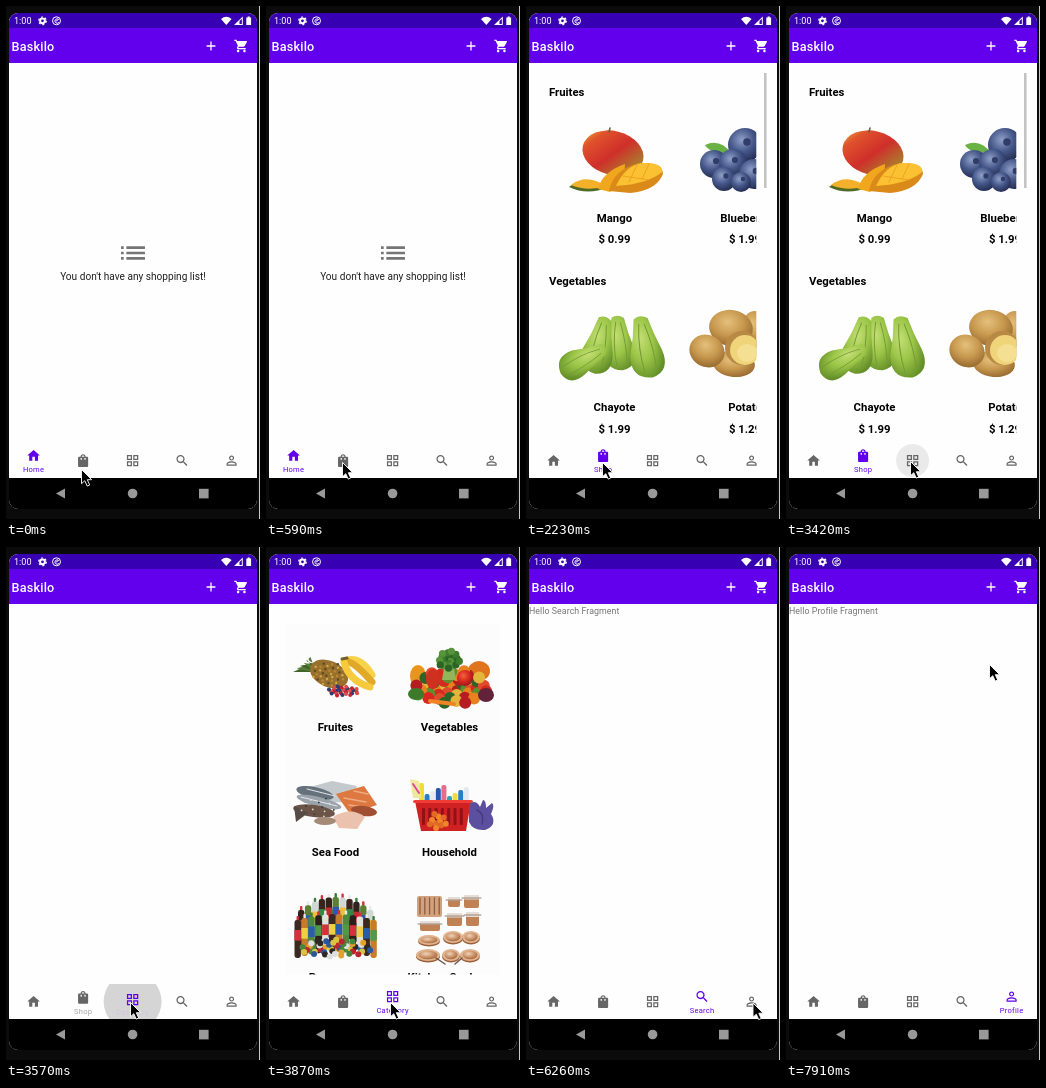
Animation of 254 by 513 pixels, one loop 8000 ms. Source, as an HTML page:

```html
<!DOCTYPE html>
<html lang="en">
<head>
<meta charset="utf-8">
<title>Shopping app</title>
<style>
html, body { margin: 0; width: 100%; height: 100%; overflow: hidden; background: #0b0b0b; }
svg { display: block; width: 100%; height: 100%; font-family: Roboto, sans-serif; }
.bold { font-weight: 700; font-size: 11.37px; fill: #000; }
.mid { text-anchor: middle; }
.hello { font-size: 8.84px; letter-spacing: .05px; fill: #757575; }
.label { font-size: 7.58px; letter-spacing: .0333em; text-anchor: middle; }
</style>
</head>
<body>
<svg id="stage" viewBox="0 0 254 513"></svg>
<script>
const LOOP = 8000, PURPLE = '#6200ee', GREY = '#666';

const ICONS = {
  home: 'M10 20v-6h4v6h5v-8h3L12 3 2 12h3v8z',
  bag: 'M18 6h-2c0-2.21-1.79-4-4-4S8 3.79 8 6H6c-1.1 0-2 .9-2 2v12c0 1.1.9 2 2 2h12c1.1 0 2-.9 2-2V8c0-1.1-.9-2-2-2zm-8 4c0 .55-.45 1-1 1s-1-.45-1-1V8h2zm2-6c1.1 0 2 .9 2 2h-4c0-1.1.9-2 2-2zm4 6c0 .55-.45 1-1 1s-1-.45-1-1V8h2z',
  grid: 'M3 3v8h8V3zm6 6H5V5h4zm-6 4v8h8v-8zm6 6H5v-4h4zm4-16v8h8V3zm6 6h-4V5h4zm-6 4v8h8v-8zm6 6h-4v-4h4z',
  search: 'M15.5 14h-.79l-.28-.27C15.41 12.59 16 11.11 16 9.5 16 5.91 13.09 3 9.5 3S3 5.91 3 9.5 5.91 16 9.5 16c1.61 0 3.09-.59 4.23-1.57l.27.28v.79l5 4.99L20.49 19zm-6 0C7.01 14 5 11.99 5 9.5S7.01 5 9.5 5 14 7.01 14 9.5 11.99 14 9.5 14z',
  person: 'M12 5.9c1.16 0 2.1.94 2.1 2.1s-.94 2.1-2.1 2.1S9.9 9.16 9.9 8s.94-2.1 2.1-2.1m0 9c2.97 0 6.1 1.46 6.1 2.1v1.1H5.9V17c0-.64 3.13-2.1 6.1-2.1M12 4C9.79 4 8 5.79 8 8s1.79 4 4 4 4-1.79 4-4-1.79-4-4-4zm0 9c-2.67 0-8 1.34-8 4v3h16v-3c0-2.66-5.33-4-8-4z',
  cart: 'M7 18c-1.1 0-2 .9-2 2s.9 2 2 2 2-.9 2-2-.9-2-2-2zM1 2v2h2l3.6 7.59-1.35 2.45C4.52 15.37 5.48 17 7 17h12v-2H7.42l-.22-.37.9-1.63h7.45c.75 0 1.41-.41 1.75-1.03l3.58-6.49C21.25 4.82 20.77 4 20 4H5.21l-.94-2zm16 16c-1.1 0-2 .9-2 2s.9 2 2 2 2-.9 2-2-.9-2-2-2z',
  plus: 'M19 13h-6v6h-2v-6H5v-2h6V5h2v6h6z',
  list: 'M3 13h2v-2H3zm0 4h2v-2H3zm0-8h2V7H3zm4 4h14v-2H7zm0 4h14v-2H7zM7 7v2h14V7z'
};
const TABS = [['home', 'Home'], ['bag', 'Shop'], ['grid', 'Category'], ['search', 'Search'], ['person', 'Profile']];
const tabX = i => 27.6 + 49.5 * i;

// Markup helpers
const icon = (name, x, y, fill, scale = .6315) =>
  `<path d="${ICONS[name]}" fill="${fill}" transform="translate(${x} ${y}) scale(${scale}) translate(-12 -12)"/>`;
const text = (x, y, str, cls, extra = '') => `<text x="${x}" y="${y}" class="${cls}" ${extra}>${str}</text>`;
const rect = (x, y, w, h, fill, r = 0) => `<rect x="${x}" y="${y}" width="${w}" height="${h}" rx="${r}" fill="${fill}"/>`;
const oval = (x, y, rx, ry, fill, turn = 0) =>
  `<ellipse cx="${x}" cy="${y}" rx="${rx}" ry="${ry}" fill="${fill}" transform="rotate(${turn} ${x} ${y})"/>`;
const ball = (x, y, r, fill) => oval(x, y, r, r, fill);
const shape = (d, fill) => `<path d="${d}" fill="${fill}"/>`;
const line = (d, color, width) => `<path d="${d}" fill="none" stroke="${color}" stroke-width="${width}" stroke-linecap="round"/>`;
const glow = (id, ...colors) => `<radialGradient id="${id}" cx=".4" cy=".35" r=".7">` +
  colors.map((c, i) => `<stop offset="${i / (colors.length - 1)}" stop-color="${c}"/>`).join('') + '</radialGradient>';
const clip = (id, x, y, w, h, r = 0) => `<clipPath id="${id}">${rect(x, y, w, h, '#000', r)}</clipPath>`;
const repeat = (n, draw) => Array.from({ length: n }, (_, i) => draw(i)).join('');
const pick = (list, i) => list[i % list.length];
// Dots spread evenly over an oval along a sunflower spiral
const scatter = (n, x, y, rx, ry, size, colors) => repeat(n, i => {
  const spread = Math.sqrt((i + .5) / n), angle = i * 2.4;
  return ball(x + rx * spread * Math.cos(angle), y + ry * spread * Math.sin(angle), size, pick(colors, i));
});

const defs = `<defs>
  ${glow('red', '#f4623c', '#d92a20', '#96141c')}${glow('blue', '#8ea0c8', '#46578a', '#20294d')}
  ${glow('potato', '#e5c07c', '#c99a50', '#94682f')}${glow('pear', '#c3de74', '#9cc648', '#648f28')}
  ${glow('copper', '#efd3b8', '#cf9a72', '#a5653d')}
  <linearGradient id="mango" x2="1" y2=".6"><stop stop-color="#e8b93c"/><stop offset=".25" stop-color="#e0522c"/>
    <stop offset=".6" stop-color="#cf2f2a"/><stop offset="1" stop-color="#a8842f"/></linearGradient>
  ${clip('screen', 3, 7, 248, 496, 9)}${clip('rows', 3, 57, 227.3, 380)}
  ${clip('cells', 3, 57, 248, 370.5)}${clip('tabs', 3, 437, 248, 35)}
</defs>`;

// Product pictures
const mango = () =>
  oval(87, 147, 31, 22, 'url(#mango)', 14) + line('M83 126l1-4', '#6d5a32', 1.5) +
  shape('M43 181Q58 168 82 181Q62 190 43 181Z', '#4f6a25') + shape('M45 179Q60 167 80 180Q62 186 45 179Z', '#f3b02a') +
  shape('M72 183Q76 166 99 158Q99 176 84 186Z', '#f0a71d') +
  shape('M83 185Q87 163 114 157Q137 156 137 168Q130 185 104 187Z', '#d98a18') +
  shape('M90 180Q99 160 116 157Q137 156 136 166Q122 178 90 180Z', '#fcc132') +
  line('M103 176l8-17m5 14l7-15m-26 12l26 4', '#e79c1c', .8);

const blueberries = () =>
  shape('M203 147Q203 127 219 123Q221 140 203 147Z', '#4f9d33') + shape('M205 147Q184 148 179 139Q194 132 205 147Z', '#69b243') +
  [[219, 139, 17], [188, 158, 14], [207, 157, 14], [228, 168, 15], [198, 173, 12], [215, 176, 10]]
    .map(([x, y, r]) => ball(x, y, r, 'url(#blue)') + ball(x + 2, y - 3, r * .22, '#313d68')).join('');

const pear = ([x, y, size, turn]) => `<g transform="translate(${x} ${y}) rotate(${turn}) scale(${size})">
  ${shape('M-6 -27Q0 -31 7 -26Q10 -10 15 5Q20 26 2 29Q-18 27 -15 6Q-9 -10 -6 -27Z', 'url(#pear)')}
  ${line('M-2 -22Q-7 0 -4 24M3 -21Q8 2 7 22', '#759c36', 1)}</g>`;
const chayote = () => [[93, 337, .95, -4], [73, 339, 1, 12], [119, 341, 1.08, -10], [57, 354, .9, 62]].map(pear).join('');

const potatoes = () =>
  oval(229, 323, 14, 18, 'url(#potato)') + oval(205, 322, 22, 18, 'url(#potato)', 10) + oval(208, 358, 21, 13, 'url(#potato)', 5) +
  oval(181, 345, 18, 16, 'url(#potato)', 25) + oval(216, 342, 17, 17, '#b78945') + oval(219, 344, 15, 15, '#f0d479') +
  oval(221, 347, 10, 9, '#f5df92');

const fruits = () =>
  repeat(6, i => shape(`M50 125L${27 + i * 3.5} ${125 - i * 3}Q38 ${119 - i} 54 118Z`, pick(['#3f6428', '#587c3a'], i))) +
  oval(63, 127, 20, 13, '#96702c', 24) + scatter(34, 63, 127, 17, 12, 1.2, ['#d4a846', '#5f471f', '#b98a36']) +
  line('M82 113Q95 110 106 128', '#f8d34a', 7) + line('M79 114Q88 114 106 135', '#e2a928', 7) +
  line('M78 115Q83 134 104 140', '#f6ca3a', 7) + line('M76 112l5-1', '#74612a', 3) +
  scatter(30, 77, 144, 16, 5, 2, ['#c02232', '#2d3c6c', '#de4b49']);

const vegetables = () =>
  oval(152, 129, 8, 11, '#e9951d') + oval(213, 124, 11, 10, '#e0741d') +
  scatter(46, 185, 140, 38, 17, 6, ['#d5291f', '#5d8f2f', '#e8811f', '#b51d20', '#e3b53a', '#2f6426', '#e14a2b']) +
  shape('M178 121h10l2 12h-14z', '#91b65a') + scatter(24, 183, 113, 11, 9, 3.6, ['#3b7d2c', '#2c6424', '#56933b']) +
  ball(199, 131, 8, 'url(#red)') + oval(167, 132, 7, 10, '#cf3120') + oval(150, 147, 8, 6, '#3d7a2a') +
  oval(220, 148, 8, 7, '#62233a') + line('M164 154L188 157', '#ef8325', 4);

const seafood = () =>
  shape('M33 243L66 234L91 239L85 255L38 256Z', '#c3c9cc') + oval(49, 246, 19, 6, '#66727b', 12) + oval(53, 255, 23, 5, '#9aa3a9', 14) +
  line('M35 250l36 9m-30-17l28 7', '#e4e7e8', 1) + oval(48, 264, 21, 6, '#6a5548', 8) + shape('M28 259L42 266L30 275Z', '#574b45') +
  shape('M70 247L98 239L111 258L84 267Z', '#dd7840') + line('M78 251l22 4m-17 3l20 3m-15-17l14 3', '#f0ab82', 1.3) +
  oval(98, 264, 13, 5, '#a04f33', 8) + shape('M67 270Q85 259 99 270L91 282L73 281Z', '#ebc2ad') +
  oval(59, 274, 11, 4, '#a58a78') + scatter(12, 52, 260, 20, 10, .9, ['#3a3532', '#dcdcda']);

const household = () =>
  repeat(9, i => rect(153 + i * 5.6, 236 + i * 11 % 14, 5, 27, pick(['#f1dc36', '#2a7fc4', '#e4e9ee', '#2456ae', '#e46c8c', '#35a0b6'], i), 2)) +
  shape('M144 232l9 2 2 17h-8z', '#f0e8a0') + line('M147 237l6 9', '#db4f92', 2) +
  shape('M149 254H205L200 284H155Z', '#cf2022') + rect(147, 253, 60, 3, '#ef3d35', 2) +
  repeat(7, i => rect(156 + i * 6.3, 261, 3, 17, '#8e1218', 1)) + scatter(10, 172, 274, 9, 9, 3, ['#f0852a', '#e26a25']) +
  shape('M203 257Q210 252 214 260L217 253Q220 253 220 261L226 256Q229 258 225 267Q232 278 219 283Q207 284 203 275Z', '#5d4f9f') +
  line('M211 263q8 4 5 14', '#433a81', 1.5);

// Bottles stand in a dome: the middle ones reach higher
const bottle = (x, y, h, color, cap, label) =>
  rect(x + 2, y, 2.4, 5, cap, 1) + rect(x, y + 4, 6.4, h, color, 2.4) + rect(x, y + 14, 6.4, h * .28, label);
const bottles = (n, left, top, bend, h, colors, labels) => repeat(n, i => {
  const fromMiddle = 2 * i / (n - 1) - 1;
  return bottle(left + i * 6.9, top + bend * fromMiddle ** 2, h, pick(colors, i), pick(['#d8303b', '#e9e9e9', '#3a7d3a'], i), pick(labels, i));
});
const beverages = () =>
  bottles(11, 32, 346, 13, 40, ['#33211c', '#5c7f36', '#cfd8d4', '#3a241d'], ['#c72930', '#2a5bb0', '#e9c23b', '#398747']) +
  bottles(12, 28.5, 363, 6, 38, ['#3c2823', '#c97b2c', '#4f8a3c', '#2b1f1b', '#dfe3da'], ['#d8303b', '#f0cf45', '#2c5dad', '#4f9a45']) +
  scatter(44, 70, 401, 36, 9, 3, ['#2c55a0', '#d8c443', '#bb252d', '#45853d', '#e1a32c', '#dedede', '#2f2723']);

const pot = (x, y, w, h) => rect(x, y, w, h, '#c08155', 2) + rect(x, y, w, h * .35, '#e6ded6', 1) + line(`M${x - 2} ${y + 3}h${w + 4}`, '#97816f', 1);
const pan = (x, y, rx, ry) => oval(x, y + 1.5, rx, ry, '#9c5f3a') + oval(x, y, rx, ry, '#e0b48f') + oval(x, y, rx - 2.5, ry - 1.8, 'url(#copper)');
const cookware = () =>
  rect(151, 349, 25, 21, '#d3a27c', 2) + repeat(5, i => line(`M${154 + i * 4.8} 351v16`, '#8b5e42', 1.3)) +
  pot(182, 350, 12, 10) + pot(198, 348, 15, 13) + pot(181, 366, 15, 13) + pot(200, 365, 13, 14) + pot(154, 374, 20, 10) +
  pan(163, 393, 11, 5) + pan(187, 390, 10, 6) + pan(205, 390, 9, 6) + pan(162, 408, 12, 6) + pan(185, 408, 9, 6) + pan(204, 408, 10, 6) +
  line('M170 411l9 6M196 411l-7 6', '#6d5547', 1.5);

// Pages
const product = (x, y, name, price) => text(x, y, name, 'bold mid') + text(x, y + 21.7, price, 'bold mid');
const category = (x, y, name) => text(x, y, name, 'bold mid');
const pages = {
  home: icon('list', 127, 247, '#757575', 1.33) +
    text(127, 273.7, "You don't have any shopping list!", 'mid', 'font-size="10.1" fill="#212121"'),
  blank: '',
  shop: `<g clip-path="url(#rows)">
    ${text(23, 90, 'Fruites', 'bold')}${mango()}${blueberries()}
    ${product(88.5, 215.6, 'Mango', '$ 0.99')}${product(219, 215.6, 'Blueberry', '$ 1.99')}
    ${text(23, 279, 'Vegetables', 'bold')}${chayote()}${potatoes()}
    ${product(88.5, 404.8, 'Chayote', '$ 1.99')}${product(219, 404.8, 'Potato', '$ 1.29')}
    </g>${rect(238, 67, 2.6, 115, '#c3c3c6')}`,
  category: `<g clip-path="url(#cells)">${rect(20, 77, 214, 351, '#fcfcfc')}
    ${fruits()}${vegetables()}${seafood()}${household()}${beverages()}${cookware()}
    ${category(69.5, 184, 'Fruites')}${category(183.5, 184, 'Vegetables')}
    ${category(69.5, 309, 'Sea Food')}${category(183.5, 309, 'Household')}
    ${category(69.5, 434, 'Beverages')}${category(183.5, 434, 'Kitchen Cookers')}</g>`,
  search: text(3, 67.2, 'Hello Search Fragment', 'hello'),
  profile: text(3, 67.2, 'Hello Profile Fragment', 'hello')
};

const chrome = `
  ${rect(3, 7, 248, 15, '#3700b3')}${rect(3, 22, 248, 35, PURPLE)}
  ${text(8, 18, '1:00', '', 'font-size="9.1" fill="#fff"')}
  <circle cx="36.5" cy="14.8" r="2.4" fill="none" stroke="#fff" stroke-width="2"/>
  <circle cx="36.5" cy="14.8" r="3.8" fill="none" stroke="#fff" stroke-width="1.2" stroke-dasharray="2 1.98"/>
  <circle cx="50.5" cy="14.8" r="4" fill="none" stroke="#fff"/>
  ${line('M52.6 16.7A2.2 2.2 0 1 1 52.6 13.4L50.4 14.9', '#fff', 1)}
  ${shape('M215 13Q220.3 8.6 225.6 13L220.3 19Z', '#fff')}
  ${shape('M228 19L236.8 10.4V19ZM233.5 18H235.8V12.8L233.5 15Z', '#fff')}
  ${shape('M240.3 11.5h1.4v-1h2v1h1.4V19h-4.8z', '#fff')}
  ${text(5.5, 45, 'Baskilo', '', 'font-size="12.63" font-weight="500" letter-spacing=".2" fill="#fff"')}
  ${icon('plus', 205, 40, '#fff')}${icon('cart', 235.3, 40, '#fff')}
  ${rect(3, 472, 248, 31, '#000')}
  ${shape('M50 487.5L59 482.5V492.5Z', '#999')}${ball(126.6, 487.5, 4.8, '#999')}${rect(193, 482.8, 9.6, 9.6, '#999')}`;

document.getElementById('stage').innerHTML = `${defs}${rect(0, 0, 254, 513, '#0b0b0b')}${rect(253, 0, 1, 513, '#c8c8c8')}
  <g clip-path="url(#screen)">${rect(3, 7, 248, 496, '#fefefe')}
  ${Object.entries(pages).map(([id, body]) => `<g id="${id}">${body}</g>`).join('')}
  ${rect(3, 437, 248, 35, '#fefefe')}<g id="tabbar" clip-path="url(#tabs)"></g>${chrome}</g>
  <path id="cursor" d="M0 0V14.2L3.3 11.2 5.7 16.6 8.2 15.5 5.8 10.2H10.2Z" fill="#000" stroke="#fff" stroke-width=".9"/>`;

// Held steps: time, from tab, to tab, switch progress, ripple radius, ripple opacity, page
const navSteps = [
  [0, 0, 0, 1, 0, 0, 'home'],
  [1640, 0, 1, 0, 16.5, .08, 'home'], [1790, 0, 1, .3, 26, .13, 'home'],
  [1940, 0, 1, .95, 30.5, .133, 'blank'], [2080, 0, 1, 1, 31, .06, 'shop'], [2230, 1, 1, 1, 0, 0, 'shop'],
  [3420, 1, 2, 0, 16.5, .08, 'shop'], [3570, 1, 2, .4, 29, .16, 'blank'],
  [3720, 1, 2, 1, 31, .07, 'category'], [3870, 2, 2, 1, 0, 0, 'category'],
  [5210, 2, 3, .35, 28, .165, 'search'], [5360, 2, 3, 1, 31, .08, 'search'], [5510, 3, 3, 1, 0, 0, 'search'],
  [6860, 3, 4, .35, 28, .165, 'profile'], [7010, 3, 4, 1, 31, .08, 'profile'], [7160, 4, 4, 1, 0, 0, 'profile']
];
// Held steps: time, tip x, tip y
const cursorSteps = [
  [0, 75.5, 463.5], [150, 74, 460], [300, 72, 456], [440, 75, 456], [590, 76.5, 456.5],
  [2820, 89, 456], [2970, 111, 452], [3120, 124.5, 455.5],
  [4310, 136, 453], [4460, 155, 450], [4610, 170, 454], [4760, 177, 455.5],
  [5810, 190, 457], [5960, 207, 457], [6110, 221, 456], [6260, 227, 456],
  [7910, 203.5, 117.5]
];
const stepAt = (steps, t) => steps.findLast(step => step[0] <= t);

function drawTabs(from, to, progress, radius, opacity) {
  const selected = progress > 0 ? to : from;
  const tabs = TABS.map(([name, label], i) => {
    const shown = i === to ? progress : i === from ? 1 - progress ** 2 : 0;
    const color = i === selected ? PURPLE : GREY, x = tabX(i);
    return icon(name, x, 454.6 - 5 * shown, color) +
      text(x, 466.2 + 3 * (1 - shown), label, 'label', `fill="${color}" opacity="${shown ** 3}"`);
  });
  return `<circle cx="${tabX(to)}" cy="454.5" r="${radius}" opacity="${opacity}"/>` + tabs.join('');
}

const byId = id => document.getElementById(id);
let drawn;
function render(now) {
  const t = now % LOOP, step = stepAt(navSteps, t), [, x, y] = stepAt(cursorSteps, t);
  if (step !== drawn) {
    const [, from, to, progress, radius, opacity, page] = drawn = step;
    for (const id in pages) byId(id).style.display = id === page ? '' : 'none';
    byId('tabbar').innerHTML = drawTabs(from, to, progress, radius, opacity);
  }
  byId('cursor').setAttribute('transform', `translate(${x} ${y})`);
  requestAnimationFrame(render);
}
render(performance.now());
</script>
</body>
</html>
```
